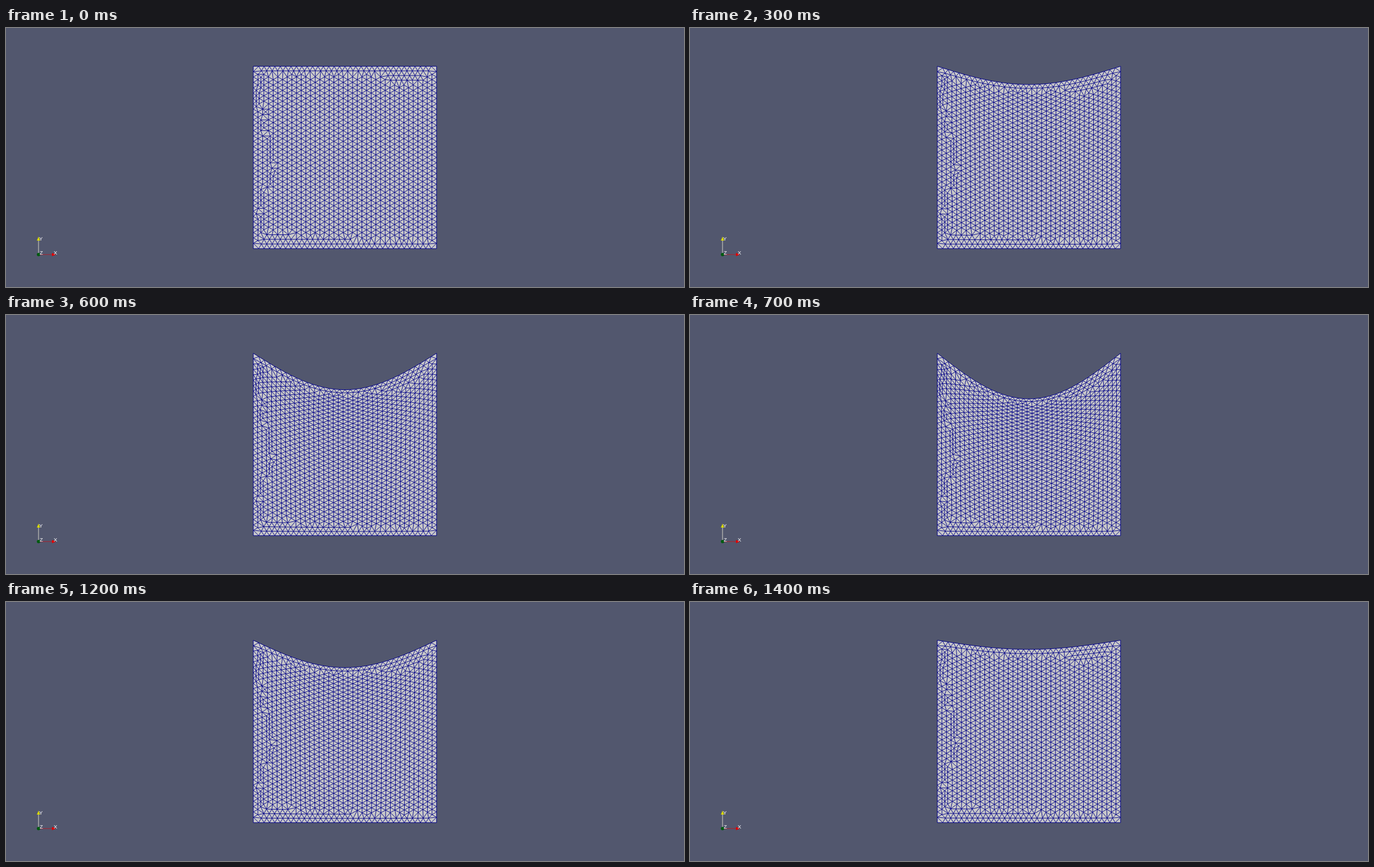
An HTML page for the animation above (1.5 s loop, 1209x463 px).

```html
<!DOCTYPE html>
<html lang="en">
<head>
<meta charset="utf-8">
<title>Mesh deformation</title>
<style>
html, body { margin: 0; width: 100%; height: 100%; overflow: hidden; background: #52576e; }
svg { display: block; width: 100vw; height: 100vh; }
text { font: 9.5px "Liberation Sans", Arial, sans-serif; fill: #fff; }
</style>
</head>
<body>
<svg viewBox="0 0 1209 463">
  <path id="body" fill="#c8c8c8"/>
  <path id="edges" fill="none" stroke="#000086" stroke-width="0.95"/>
  <path id="rim" fill="none" stroke="#000086" stroke-width="1"/>
  <path d="M58 405V379" stroke="#d8d8c8"/>
  <path d="M58 405H83" stroke="#b01c28"/>
  <path d="M58 373L61 380H55Z" fill="#d8d800"/>
  <path d="M89 405L82 408V402Z" fill="#e00000"/>
  <circle cx="58" cy="405" r="3" fill="#005a10"/>
  <text x="59" y="380">Y</text>
  <text x="60" y="405">Z</text>
  <text x="85" y="405">X</text>
</svg>
<script>
const X0 = 441, Y0 = 68.4, SIZE = 326.8, HEIGHT = 326;
const N = 34, H = 1 / N, C = H * Math.sqrt(3) / 2;
const LEVELS = [0, 0, 1, 2, 2, 3, 4, 5, 5, 5, 4, 4, 3, 2, 1];

// Column where the left and right lattices meet, by lower end of each stretch.
const SEAM = [[111, 1], [141, 0], [156, 2], [190, 1], [246, 3], [257, 4], [287, 3], [324, 1], [335, 0], [400, 1]];
const seamAt = y => SEAM.find(s => Y0 + y * HEIGHT <= s[0])[1];

function makeNodes() {
  const nodes = [];
  const add = (x, y) => {
    if (x < 0 || x > 1 || y < 0 || y > 1) return;
    if (nodes.every(p => Math.hypot(p.x - x, p.y - y) > 0.7 * H)) nodes.push({ x, y });
  };
  for (let i = 0; i <= N; i++) {
    add(i * H, 0); add(i * H, 1); add(0, i * H); add(1, i * H);
  }
  for (let i = 1; i < N - 1; i++) {
    add((i + 0.5) * H, C); add((i + 0.5) * H, 1 - C);
  }
  for (let i = 2; i < N - 1; i++) {
    const x = i * H;
    if (x > 0.71 && x < 0.94) { add(x, 2 * C); add(x + H / 2, 3 * C); }
    if (x < 0.53) add(x, 1 - 2 * C);
    if (x < 0.2) add(x + H / 2, 1 - 3 * C);
  }
  for (let k = 1; k < 39; k++) {
    for (let i = 0; i < N; i++) {
      const y = (i + k % 2 / 2) * H, s = seamAt(y);
      if (k <= s) add(k * C, y);
      if (k <= 38 - s) add(1 - k * C, y);
    }
  }
  for (let i = 1; i < 2 * N; i++) {
    const y = i * H / 2, s = seamAt(y);
    if ((i + s) % 2) add((s * C + 1 - (38 - s) * C) / 2, y);
  }
  return nodes;
}

function circumscribe(a, b, c) {
  const bx = b.x - a.x, by = b.y - a.y, cx = c.x - a.x, cy = c.y - a.y;
  const d = 2 * (bx * cy - by * cx), bb = bx * bx + by * by, cc = cx * cx + cy * cy;
  const ux = (cy * bb - by * cc) / d, uy = (bx * cc - cx * bb) / d;
  return { v: [a, b, c], x: a.x + ux, y: a.y + uy, r: ux * ux + uy * uy };
}

// Delaunay triangulation by insertion; returns the unique edges.
function triangulate(nodes) {
  const far = [{ x: -90, y: -80 }, { x: 95, y: -70 }, { x: 3, y: 110 }];
  far.concat(nodes).forEach((p, i) => p.id = i);
  let tris = [circumscribe(...far)];
  const sides = ([a, b, c]) => [[a, b], [b, c], [c, a]];
  const key = (a, b) => Math.min(a.id, b.id) * 1e4 + Math.max(a.id, b.id);
  for (const p of nodes) {
    const hole = new Map(), keep = [];
    for (const t of tris) {
      if ((p.x - t.x) ** 2 + (p.y - t.y) ** 2 >= t.r - 1e-10) { keep.push(t); continue; }
      for (const [a, b] of sides(t.v)) {
        const k = key(a, b);
        if (hole.has(k)) hole.delete(k); else hole.set(k, [a, b]);
      }
    }
    for (const [a, b] of hole.values()) {
      const area = (b.x - a.x) * (p.y - a.y) - (b.y - a.y) * (p.x - a.x);
      if (Math.abs(area) > 1e-12) keep.push(circumscribe(a, b, p));
    }
    tris = keep;
  }
  const edges = new Map();
  for (const t of tris) {
    for (const [a, b] of sides(t.v)) if (a.id > 2 && b.id > 2) edges.set(key(a, b), [a, b]);
  }
  return [...edges.values()];
}

// Plane elasticity with fixed sides and floor, and a sine pushed into the top.
function solveField() {
  const n = N + 1, u = new Float64Array(n * n), v = new Float64Array(n * n), b = 2.5, w = 1.5;
  for (let i = 0; i < n; i++) v[i] = Math.sin(Math.PI * i / N);
  const cross = (f, q) => (f[q + n + 1] - f[q + n - 1] - f[q - n + 1] + f[q - n - 1]) / 4;
  for (let step = 0; step < 500; step++) {
    for (let j = 1; j < N; j++) for (let i = 1; i < N; i++) {
      const q = j * n + i, div = 2 * (2 + b);
      const nu = ((1 + b) * (u[q - 1] + u[q + 1]) + u[q - n] + u[q + n] + b * cross(v, q)) / div;
      u[q] += w * (nu - u[q]);
      const nv = ((1 + b) * (v[q - n] + v[q + n]) + v[q - 1] + v[q + 1] + b * cross(u, q)) / div;
      v[q] += w * (nv - v[q]);
    }
  }
  return (x, y) => {
    const i = Math.min(N - 1, Math.floor(x * N)), j = Math.min(N - 1, Math.floor(y * N));
    const s = x * N - i, t = y * N - j, q = j * n + i;
    const mix = f => (f[q] * (1 - s) + f[q + 1] * s) * (1 - t) + (f[q + n] * (1 - s) + f[q + n + 1] * s) * t;
    return [mix(u), mix(v)];
  };
}

const nodes = makeNodes();
const field = solveField();
for (const p of nodes) [p.u, p.v] = field(p.x, p.y);
const inner = triangulate(nodes).filter(([a, b]) =>
  !(a.x === b.x && (a.x === 0 || a.x === 1)) && !(a.y === b.y && (a.y === 0 || a.y === 1)));
const topNodes = nodes.filter(p => p.y === 0).sort((a, b) => a.x - b.x);
const $ = id => document.getElementById(id);

function draw(level) {
  const amp = level * 0.05;
  const at = p => (X0 + (p.x + amp * p.u) * SIZE).toFixed(2) + " " + (Y0 + (p.y + amp * p.v) * HEIGHT).toFixed(2);
  const outline = "M" + topNodes.map(at).join("L") + `V${Y0 + HEIGHT}H${X0}Z`;
  $("body").setAttribute("d", outline);
  $("rim").setAttribute("d", outline);
  $("edges").setAttribute("d", inner.map(([a, b]) => `M${at(a)}L${at(b)}`).join(""));
}

let shown = -1;
const start = performance.now();
function tick(now) {
  const level = LEVELS[Math.floor(Math.max(0, now - start) % 1500 / 100)];
  if (level !== shown) draw(shown = level);
  requestAnimationFrame(tick);
}
tick(start);
</script>
</body>
</html>
```
